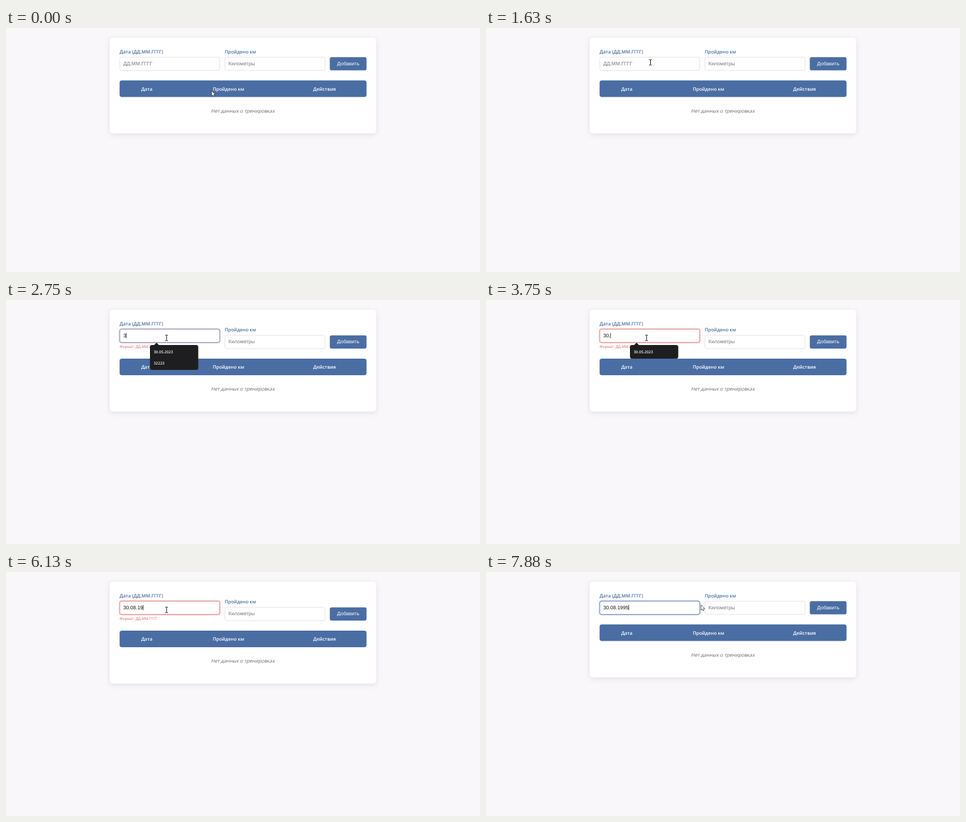
An HTML page that plays this animation: 800 px wide and 412 px high, repeating every 8 s.

```html
<!DOCTYPE html>
<html lang="ru">
<head>
<meta charset="utf-8">
<title>Тренировки</title>
<style>
  html, body { margin: 0; width: 100%; height: 100%; overflow: hidden; background: #f9f7fa; }
  svg { display: block; text-rendering: geometricPrecision; }
  text { font: 8.5px "Liberation Sans", Arial, sans-serif; white-space: pre; }
  .label, .head { font: 600 7.9px "Open Sans", "Noto Sans", sans-serif; fill: #4a6da3; }
  .head { fill: #fff; text-anchor: middle; }
  .hint { fill: #757575; }
  .box { fill: #fff; stroke: #e1e4ec; }
  .blue { fill: #4a6da3; }
  .empty { font: 8.2px "Open Sans", "Noto Sans", sans-serif; fill: #666; text-anchor: middle; }
  #error { font: 6.3px "Open Sans", "Noto Sans", sans-serif; fill: #d9605a; }
  #menu text { font: 600 6.4px "Open Sans", "Noto Sans", sans-serif; fill: #f4f4f4; }
  #card { filter: drop-shadow(0 2px 4px rgba(40, 60, 90, .13)); }
</style>
</head>
<body>
<svg width="800" height="412">
  <rect id="card" x="175" y="16.5" width="450" rx="5.5" fill="#fff"/>
  <text class="label" x="191.7" y="42.7">Дата (ДД.ММ.ГГГГ)</text>

  <g id="lower">
    <text class="label" x="369" y="42.7">Пройдено км</text>
    <rect class="box" x="369.5" y="49.2" width="169" height="22.5" rx="3"/>
    <text class="hint" x="375.6" y="63">Километры</text>
    <rect class="blue" x="546.5" y="49.3" width="62" height="22.2" rx="3"/>
    <text x="558.8" y="63" fill="#fff">Добавить</text>
    <rect class="blue" x="191.7" y="88.5" width="416.8" height="28" rx="4"/>
    <text class="head" x="237.6" y="105.9">Дата</text>
    <text class="head" x="375.5" y="105.9">Пройдено км</text>
    <text class="head" x="537.7" y="105.9">Действия</text>
    <text class="empty" transform="translate(399.7 142.7) skewX(-11)">Нет данных о тренировках</text>
  </g>

  <rect id="ring" x="191" y="48.2" width="170.5" height="24.5" rx="4" fill="none" stroke-width="1.4" opacity=".25"/>
  <rect id="field" class="box" x="192" y="49.2" width="168.8" height="22.5" rx="3"/>
  <text id="value" x="198" y="63"></text>
  <path id="caret" d="M0 55.7v8.8" stroke="#111" stroke-width=".8"/>
  <text id="error" x="191.7" y="80.8">Формат: ДД.ММ.ГГГГ</text>

  <g id="menu">
    <path d="M249.5 76.5l4.5-4.5 4.5 4.5z" fill="#1e1e20"/>
    <rect x="243" y="76" width="81.5" rx="3.5" fill="#1e1e20"/>
  </g>

  <path id="beam" d="M-2.2-4.6h1.6l.6.5.6-.5h1.6M0-4.1v8.2M-2.2 4.6h1.6l.6-.5.6.5h1.6" fill="none" stroke="#111"/>
  <path id="arrow" d="M0 0v9l2-1.8 1.3 3 1.5-.7-1.3-2.9h2.8z" fill="#fff" stroke="#222" stroke-width=".7"/>
</svg>
<script>
const $ = id => document.getElementById(id);
const LOOP = 8000, STEP = 125, FOCUS = 2000, INVALID = 2750, VALID = 6375;
const DATE = '30.08.1995';
const history = ['30.05.2023', '23.12.2023', '32223', '10.10.2021'];

// Click, then one entry per typed character
const keys = [1875, 2750, 3250, 3750, 4000, 4250, 5250, 5750, 6125, 6250, 6375];
// Pointer path: time, x, y
const path = [
  [0, 347, 106], [625, 356, 69], [750, 356, 69], [1000, 330, 55], [1250, 302, 52], [1625, 277.5, 58],
  [1875, 277.5, 58], [2000, 271, 64], [7500, 271, 64], [7875, 363, 55.5]
];

const GREY = [225, 228, 236], BLUE = [92, 121, 178], RED = [222, 118, 114];
const ramp = (t, from, to) => Math.min(1, Math.max(0, (t - from) / (to - from)));
const mix = (a, b, k) => a.map((v, i) => v + (b[i] - v) * k);
const show = (el, on) => el.setAttribute('visibility', on ? 'visible' : 'hidden');

const rows = history.map((text, i) => {
  const row = document.createElementNS('http://www.w3.org/2000/svg', 'text');
  row.setAttribute('x', 249.2);
  row.textContent = text;
  return $('menu').appendChild(row);
});

function pointer(t) {
  const i = path.findIndex(p => p[0] > t);
  if (i < 0) return path.at(-1).slice(1);
  const a = path[i - 1], b = path[i];
  return mix(a, b, ramp(t, a[0], b[0])).slice(1);
}

function drawField(t, focused) {
  const typed = keys.filter(k => k <= t).length - 1;
  const text = DATE.slice(0, Math.max(0, typed));
  const value = $('value');
  value.textContent = text || 'ДД.ММ.ГГГГ';
  value.setAttribute('fill', text ? '#111' : '#757575');

  const idle = t - keys[typed];
  const width = text ? value.getComputedTextLength() : 0;
  $('caret').setAttribute('transform', `translate(${198.3 + width})`);
  show($('caret'), focused && (idle < 500 || idle >= 1000));

  const red = ramp(t, 2625, 3000) - ramp(t, 6200, 6450);
  const color = `rgb(${mix(mix(GREY, BLUE, ramp(t, 1875, 2125)), RED, red)})`;
  $('field').style.stroke = color;
  $('ring').style.stroke = color;
  show($('ring'), focused);
  return text;
}

function drawMenu(text, focused) {
  let count = 0;
  for (const row of rows) {
    const match = focused && row.textContent.startsWith(text);
    row.style.display = match ? '' : 'none';
    if (match) row.setAttribute('y', 89.9 + 18.8 * count++);
  }
  // The full date has no suggestions, so an empty list hides the popup
  $('menu').style.display = count ? '' : 'none';
  $('menu').querySelector('rect').setAttribute('height', 4.3 + 18.8 * count);
}

function draw(now) {
  const t = Math.floor(now % LOOP / STEP) * STEP;
  const focused = t >= FOCUS;
  const invalid = t >= INVALID && t < VALID;
  const shift = invalid ? 10.4 : 0;

  $('card').setAttribute('height', 161.5 + shift);
  $('lower').setAttribute('transform', `translate(0 ${shift})`);
  show($('error'), invalid);
  drawMenu(drawField(t, focused), focused);

  const [x, y] = pointer(t);
  const overField = x > 192 && x < 361 && y > 49 && y < 72;
  for (const id of ['beam', 'arrow']) $(id).setAttribute('transform', `translate(${x} ${y})`);
  show($('beam'), overField);
  show($('arrow'), !overField);
  requestAnimationFrame(draw);
}
requestAnimationFrame(draw);
</script>
</body>
</html>
```
